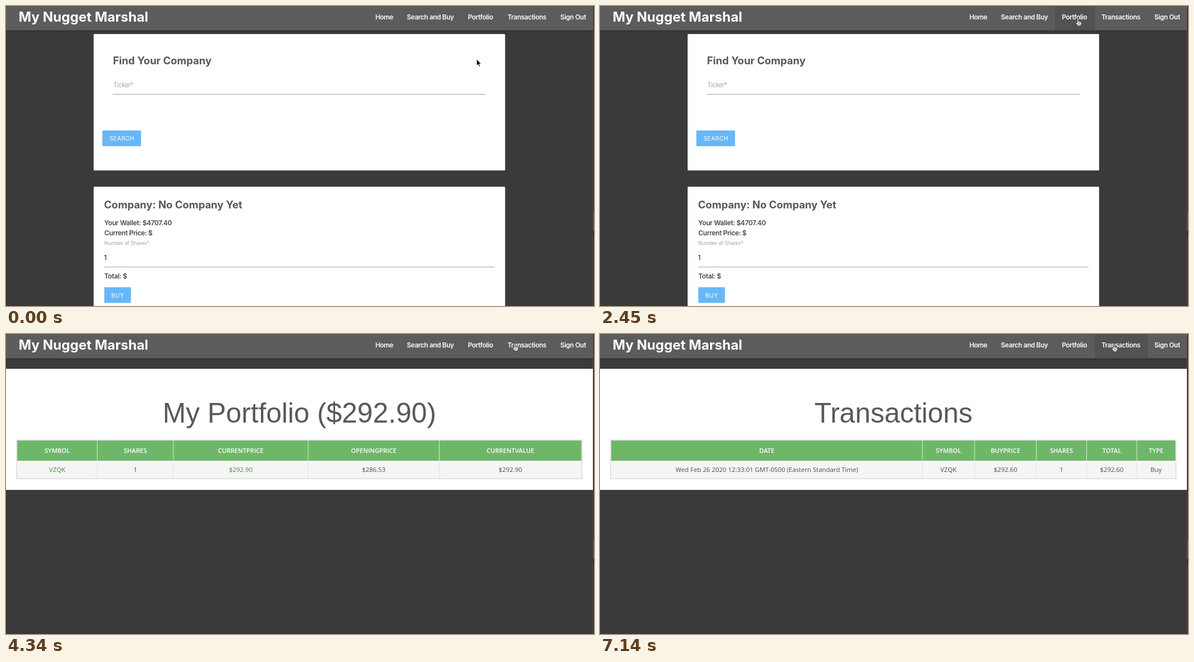
Animation of 1047x535 px, one loop 7630 ms. Source, as an HTML page:

```html
<!DOCTYPE html>
<html lang="en">
<head>
<meta charset="utf-8">
<title>Portfolio demo</title>
<style>
  html, body { margin: 0; width: 100%; height: 100%; overflow: hidden; background: #3a3a3a; }
  svg { display: block; width: 1047px; height: 535px; }
  text { white-space: pre; }
  .brand { font: 700 24.1px Inter, sans-serif; fill: #fff; }
  .nav { font: 600 11.7px Inter, sans-serif; letter-spacing: -.33px; fill: #fff; }
  .head { font: 700 18.4px Inter, sans-serif; fill: #575757; }
  .info { font: 600 11.9px Inter, sans-serif; letter-spacing: -.32px; fill: #484848; }
  .label { font: 300 11.3px Inter, sans-serif; letter-spacing: -.4px; fill: #8f8f8f; }
  .small { font: 300 9px Inter, sans-serif; letter-spacing: -.03px; fill: #858585; }
  .value { font: 400 12px Inter, sans-serif; fill: #111; }
  .button { font: 400 10.3px Inter, sans-serif; letter-spacing: .4px; fill: #fff; }
  .title { font: 49.5px "Liberation Sans", Arial, sans-serif; fill: #595959; text-anchor: middle; }
  .th { font: 600 11.1px "Open Sans", sans-serif; fill: #fff; text-anchor: middle; }
  .td { font: 400 11.35px "Open Sans", sans-serif; fill: #4c4c4c; text-anchor: middle; }
  .up { fill: #43903c; }
  .star { fill: #cf7f7f; }
</style>
</head>
<body>
<svg id="stage" viewBox="0 0 1047 535"></svg>
<script>
const LOOP = 7630, STEP = 70;
const TICKER = "VZQK";

const text = (cls, x, y, s) => `<text class="${cls}" x="${x}" y="${y}">${s}</text>`;
const rect = (x, y, w, h, fill, more = "") =>
  `<rect x="${x}" y="${y}" width="${w}" height="${h}" fill="${fill}" ${more}/>`;
const star = '<tspan class="star">*</tspan>';

function searchPage() {
  return rect(156, 50, 732.7, 243.3, "#fff", 'rx="1.5"') +
    text("head", 190.5, 104.2, "Find Your Company") +
    text("label", 191, 144.5, "Ticker" + star) +
    rect(190, 157, 664, 1, "#a3a3a3") +
    rect(171.5, 222, 69, 28, "#67b7f8", 'rx="1"') +
    text("button", 184.3, 240.2, "SEARCH") +
    rect(156, 322.3, 732.7, 230, "#fff", 'rx="1.5"') +
    text("head", 174.5, 360.9, "Company: No Company Yet") +
    text("info", 175, 391.4, "Your Wallet: $4707.40") +
    text("info", 175, 408.9, "Current Price: $") +
    text("small", 175, 426, "Number of Shares" + star) +
    text("value", 174.5, 452.7, "1") +
    rect(175, 465, 695, 1, "#a3a3a3") +
    text("info", 175, 485.7, "Total: $") +
    rect(175, 501.5, 47.5, 28, "#67b7f8", 'rx="1"') +
    text("button", 187.5, 519.5, "BUY");
}

// edges holds the column borders, outer ones included
function tablePage(title, edges, heads, cells, green = []) {
  let out = rect(0, 62, 1045.5, 216, "#fff") +
    text("title", 522.5, 158, title) +
    rect(18, 188, 1008.5, 71, "#e2e2e2") +
    rect(20, 190, 1004.5, 36, "#6eb769") +
    rect(20, 226, 1004.5, 31, "#f5f5f5");
  heads.forEach((head, i) => {
    const mid = (edges[i] + edges[i + 1]) / 2;
    if (i) out += rect(edges[i] - .5, 190, 1, 36, "#dcebda") + rect(edges[i] - .5, 226, 1, 31, "#e2e2e2");
    out += text("th", mid, 211.8, head) +
      text(green.includes(i) ? "td up" : "td", mid, 245.6, cells[i]);
  });
  return out;
}

const links = [[657.7, "Home"], [713.7, "Search and Buy"], [822.4, "Portfolio"],
  [892.9, "Transactions"], [987, "Sign Out"]];

document.getElementById("stage").innerHTML =
  rect(0, 0, 1047, 535, "#3a3a3a") +
  `<g id="search">${searchPage()}</g>
   <g id="portfolio">${tablePage("My Portfolio ($292.90)", [20, 162.5, 298, 538, 771.5, 1024.5],
     ["SYMBOL", "SHARES", "CURRENTPRICE", "OPENINGPRICE", "CURRENTVALUE"],
     [TICKER, "1", "$292.90", "$286.53", "$292.90"], [0, 2])}</g>
   <g id="transactions">${tablePage("Transactions", [20, 574, 667, 777, 866.5, 956, 1024.5],
     ["DATE", "SYMBOL", "BUYPRICE", "SHARES", "TOTAL", "TYPE"],
     ["Wed Feb 26 2020 12:33:01 GMT-0500 (Eastern Standard Time)", TICKER, "$292.60", "1", "$292.60", "Buy"])}</g>` +
  rect(0, 0, 1047, 43.5, "#5c5c5c") +
  rect(810, 0, 71, 43.5, "#525252", 'id="hoverPortfolio"') +
  rect(881, 0, 94, 43.5, "#525252", 'id="hoverTransactions"') +
  rect(0, 43.5, 1047, 1, "#303030") +
  rect(0, 44.5, 1047, 1.5, "#353535") +
  text("brand", 22.5, 27.5, "My Nugget Marshal") +
  links.map(([x, s]) => text("nav", x, 23.6, s)).join("") +
  rect(1045, 0, 1, 535, "#555") +
  rect(1046, 0, 1, 535, "#202020") +
  rect(1046, 367, 1, 34, "#555") +
  rect(1046, 401, 1, 11, "#000") +
  `<path id="arrow" d="M0 0V11.2L2.6 8.9L4.4 13L6.3 12.2L4.5 8.2H8Z"
     fill="#000" stroke="#fff" stroke-width=".8" stroke-linejoin="round"/>
   <g id="hand" stroke="#222" stroke-width=".8" stroke-linejoin="round" stroke-linecap="round">
     <path fill="#fff" d="M-1.3 7V1Q-1.2 0 -.2 0Q.8 0 .9 1V4.6Q2 4 2.8 5Q4 4.5 4.6 5.6Q6 5.3 6.2 6.8V9.2Q6 11.3 5 12.2V13.6H-.5V12.3L-3.8 8.6Q-4.2 7.4 -3.2 7Q-2.4 6.9 -1.3 8.2Z"/>
     <path fill="none" d="M.9 4.6V7M2.8 5V7.2M4.6 5.6V7.4M1.2 9V11.2M3.2 9V11.2"/>
   </g>`;

const $ = id => document.getElementById(id);
const show = (id, on) => $(id).setAttribute("opacity", +on);

// time, x, y of the pointer
const path = [[0, 838, 95], [980, 838, 95], [1190, 841, 66], [1330, 847, 46], [1470, 850, 33],
  [1750, 851, 22], [3990, 851, 22], [4340, 906, 17], [4620, 915, 18], [4900, 915, 18],
  [5040, 916, 18], [7070, 916, 18], [7140, 915, 18], [LOOP, 915, 18]];

function pointer(t) {
  const i = path.findIndex(p => p[0] > t);
  const [a, b] = [path[i - 1], path[i]];
  const k = (t - a[0]) / (b[0] - a[0]);
  return [a[1] + (b[1] - a[1]) * k, a[2] + (b[2] - a[2]) * k];
}

function draw(time) {
  const t = Math.floor(time % LOOP / STEP) * STEP;
  show("search", t < 2520);
  show("portfolio", t >= 2520 && t < 5460);
  show("transactions", t >= 5460);
  show("hoverPortfolio", t < 2240 ? 0 : Math.max(0, Math.min(1, (4340 - t) / 210)));
  show("hoverTransactions", t >= 5180);

  const [x, y] = pointer(t);
  const onLink = y < 43;
  show("arrow", !onLink);
  show("hand", onLink);
  $(onLink ? "hand" : "arrow").setAttribute("transform", `translate(${x} ${y})`);
}

const start = performance.now();
function tick() {
  draw(performance.now() - start);
  requestAnimationFrame(tick);
}
tick();
</script>
</body>
</html>
```
